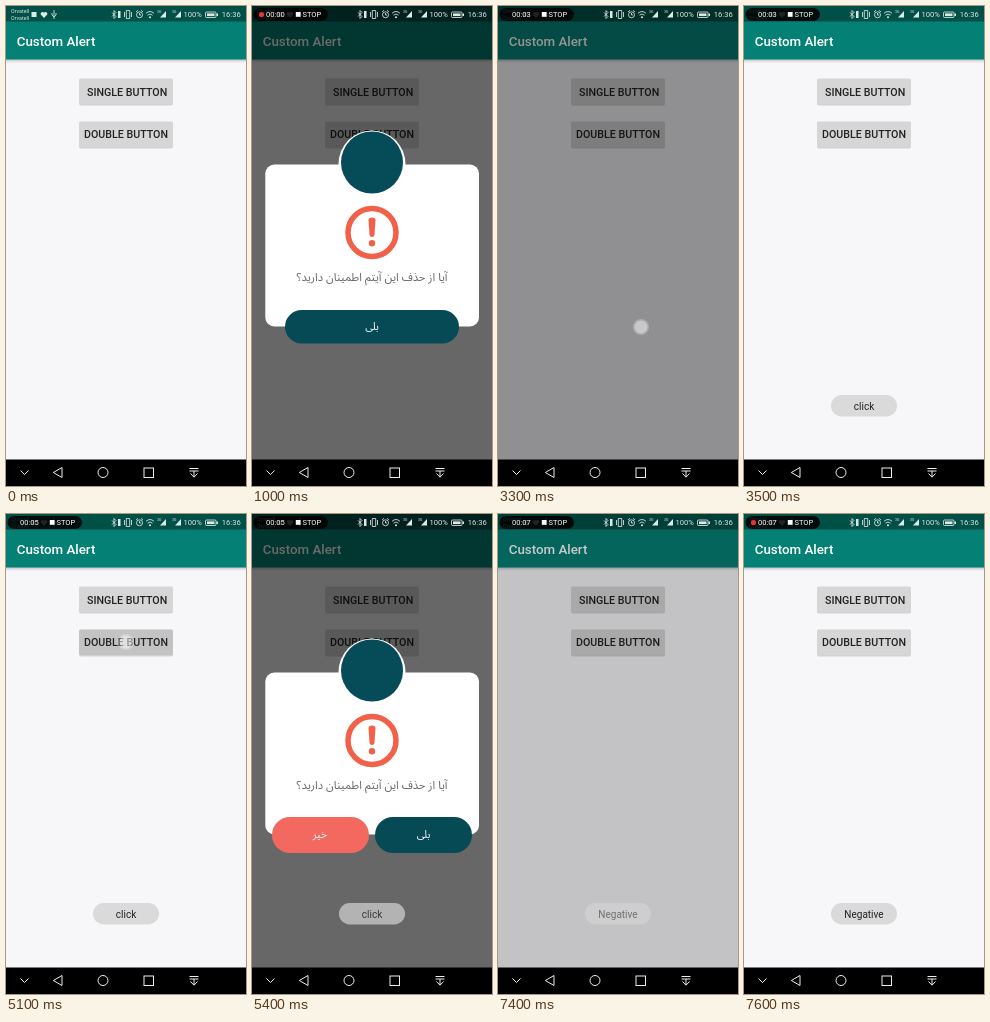
Write an HTML page that moves like this. It is 240 px wide and 480 px high and loops after 8000 ms.

```html
<!DOCTYPE html>
<html lang="en">
<head>
<meta charset="utf-8">
<title>Custom Alert</title>
<style>
  html, body { margin: 0; width: 100%; height: 100%; overflow: hidden; background: #000; }
  svg { display: block; width: 100vw; height: 100vh; font-family: Roboto, "Noto Sans", "DejaVu Sans", sans-serif; }
  .mid { text-anchor: middle; }
  .bold { font-weight: 500; }
  .line { fill: none; stroke: #eee; }
  .fa { font-family: "Noto Sans Arabic", "DejaVu Sans", sans-serif; text-anchor: middle; direction: rtl; }
</style>
</head>
<body>
<svg viewBox="0 0 240 480">
  <defs>
    <linearGradient id="shade" x2="0" y2="1">
      <stop stop-opacity=".22"/><stop offset="1" stop-opacity="0"/>
    </linearGradient>
    <g id="signal">
      <path d="M0 11.5L6 5v6.5z" fill="#dce9e7"/>
      <text x="-3" y="7" font-size="3.5" fill="#dce9e7">3G</text>
    </g>
  </defs>

  <!-- app -->
  <rect width="240" height="454" fill="#f7f6f9"/>
  <rect y="53" width="240" height="4" fill="url(#shade)"/>
  <rect width="240" height="53.5" fill="#058074"/>
  <rect width="240" height="15.5" fill="#005047"/>
  <text class="bold" x="10.7" y="39.8" font-size="13.33" fill="#fff">Custom Alert</text>
  <g class="mid bold" font-size="10.67" fill="#222">
    <rect x="73" y="73" width="94" height="26.5" rx="2" fill="#000" opacity=".15"/>
    <rect x="73" y="72.5" width="94" height="25.5" rx="1.5" fill="#d6d6d7"/>
    <rect x="73" y="116" width="94" height="26.5" rx="2" fill="#000" opacity=".15"/>
    <rect x="73" y="115.5" width="94" height="25.5" rx="1.5" fill="#d6d6d7"/>
    <rect id="ripple" x="73" width="94" height="25.5" rx="1.5" opacity="0"/>
    <text x="121.2" y="89.5">SINGLE BUTTON</text>
    <text x="120" y="132.3">DOUBLE BUTTON</text>
  </g>

  <!-- dialog -->
  <rect id="dim" width="240" height="454"/>
  <g id="dialog">
    <rect x="13.3" y="158.5" width="213.7" height="162" rx="9" fill="#fff"/>
    <circle cx="120" cy="158" r="33.5" fill="#fff"/>
    <circle cx="120" cy="156.5" r="31" fill="#064c58"/>
    <g fill="#f1614a">
      <circle cx="120" cy="226.5" r="24" fill="none" stroke="#f1614a" stroke-width="5.5"/>
      <path d="M116.5 214q0-2.5 3.5-2.5t3.5 2.5l-1 15q-.3 2-2.5 2t-2.5-2z"/>
      <circle cx="120" cy="237.3" r="3.2"/>
    </g>
    <text class="fa" x="120" y="275" font-size="11.3" fill="#666">آیا از حذف این آیتم اطمینان دارید؟</text>
    <g id="one" fill="#fff">
      <rect x="33" y="304" width="174" height="33.5" rx="16.7" fill="#064a55"/>
      <text class="fa" x="120" y="323.5" font-size="10.5">بلی</text>
    </g>
    <g id="two" fill="#fff">
      <rect x="20" y="303" width="97" height="36" rx="18" fill="#f4695f"/>
      <rect x="123" y="303" width="97" height="36" rx="18" fill="#064a55"/>
      <text class="fa" x="68" y="323.5" font-size="10.5">خیر</text>
      <text class="fa" x="171.5" y="323.5" font-size="10.5">بلی</text>
    </g>
  </g>

  <g id="toast">
    <rect x="87" y="389" width="66" height="21.5" rx="10.7" fill="#dadada"/>
    <text id="message" class="mid" x="120" y="403.6" font-size="10" fill="#222"></text>
  </g>
  <g id="touch" fill="#fff">
    <circle r="8" opacity=".25"/><circle r="6.5" opacity=".35"/>
  </g>

  <!-- status bar -->
  <g fill="#dce9e7">
    <g font-size="5.3"><text x="5" y="7.2">Orvatell</text><text x="5" y="14">Orvatell</text></g>
    <rect x="25.5" y="6" width="5" height="5"/>
    <path d="M38 12l-3.3-3.5a2 2 0 0 1 3.3-2 2 2 0 0 1 3.3 2z"/>
    <path class="line" d="M48 4v9M46 7v2l2 2 2-2V7" stroke-width=".8"/>
    <g class="line" stroke-width=".8">
      <path d="M106 6.5l4 4-2 2V4.5l2 2-4 4"/>
      <path d="M118.5 6v5M125.5 6v5M120.3 4.5h3.4v8h-3.4z"/>
      <circle cx="133.5" cy="8.8" r="3"/><path d="M133.5 7v2h1.5M130 6l2-1.7M137 6l-2-1.7"/>
      <path d="M140 7.3q4-3.6 8 0M141.5 9.2q2.5-2.4 5 0"/>
      <rect x="199.5" y="6" width="10.5" height="5.5" rx="1"/>
    </g>
    <circle cx="144" cy="11.3" r="1"/>
    <rect x="112" y="5" width="2.5" height="7"/>
    <rect x="201" y="7.4" width="7.5" height="2.7"/><rect x="210.5" y="7.5" width="1.5" height="2.5"/>
    <use href="#signal" x="154"/><use href="#signal" x="169"/>
    <g font-size="7.6"><text x="177.5" y="11.4">100%</text><text x="215.8" y="11.4">16:36</text></g>
  </g>

  <!-- recorder -->
  <g id="recorder" font-size="7.5" fill="#fff">
    <rect x="1.5" y="2" width="74.5" height="13" rx="6.5" fill="#000" opacity=".85"/>
    <circle id="dot" cx="9.5" cy="8.5" r="2.6" fill="#f03030"/>
    <text id="clock" x="14" y="11.2"></text>
    <rect x="43.8" y="6" width="4.8" height="4.8"/>
    <text x="50.5" y="11.2">STOP</text>
  </g>

  <!-- navigation bar -->
  <rect y="453.5" width="240" height="26.5"/>
  <g class="line">
    <path d="M14.5 464.5l4 4 4-4"/>
    <path d="M56 461.5v10l-8.7-5z"/>
    <circle cx="97" cy="466.5" r="5"/>
    <rect x="138" y="462" width="9.5" height="9.5"/>
    <path d="M183.5 462.5h9M183.5 465h9M188 465v6M184.5 467.5l3.5 3.7 3.5-3.7"/>
  </g>
</svg>
<script>
const el = id => document.getElementById(id);
const fade = (id, value) => el(id).setAttribute("opacity", value);

// Linear interpolation through alternating times and values.
function track(t, ...keys) {
  if (t <= keys[0]) return keys[1];
  for (let i = 2; i < keys.length; i += 2) {
    if (t <= keys[i]) {
      const k = (t - keys[i - 2]) / (keys[i] - keys[i - 2]);
      return keys[i - 1] + k * (keys[i + 1] - keys[i - 1]);
    }
  }
  return keys[keys.length - 1];
}

// start, end, x, y of each finger press
const presses = [
  [600, 700, 120, 86], [1600, 1700, 224, 325], [2500, 3300, 143, 321],
  [5100, 5200, 120, 128], [7100, 7300, 70, 321]
];

function draw(t) {
  const second = t > 4500;
  fade("recorder", track(t, 0, 0, 100, .4, 200, .8, 300, 1));
  el("clock").textContent = "00:0" + Math.floor(Math.max(0, t - 100) / 1000);
  fade("dot", (t + 900) % 1000 < 500 ? 0 : 1);

  fade("dim", track(t, 700, 0, 1000, .58, 3100, .58, 3300, .42, 3500, 0,
    5100, 0, 5400, .58, 7100, .58, 7300, .42, 7500, 0));
  const shown = track(t, 800, 0, 1000, 1, 3100, 1, 3300, 0, 5100, 0, 5400, 1, 7100, 1, 7300, 0);
  const scale = .92 + .08 * shown;
  fade("dialog", shown);
  el("dialog").setAttribute("transform", `translate(120 240) scale(${scale}) translate(-120 -240)`);
  fade("one", second ? 0 : 1);
  fade("two", second ? 1 : 0);

  el("message").textContent = second && t > 6000 ? "Negative" : "click";
  fade("toast", track(t, 3300, 0, 3500, 1, 5200, 1, 5800, 0, 7300, 0, 7500, 1));

  el("ripple").setAttribute("y", second ? 115.5 : 72.5);
  fade("ripple", track(t, 500, 0, 600, .1, 800, .1, 900, 0, 5000, 0, 5100, .1, 5200, .1, 5300, 0));
  const press = presses.find(([start, end]) => t >= start && t <= end - (end - start === 100 ? 1 : 0));
  fade("touch", press ? 1 : 0);
  if (press) el("touch").setAttribute("transform", `translate(${press[2]} ${press[3]})`);
}

function tick() {
  draw(Math.floor(performance.now() % 8000 / 100) * 100);
  requestAnimationFrame(tick);
}
tick();
</script>
</body>
</html>
```
